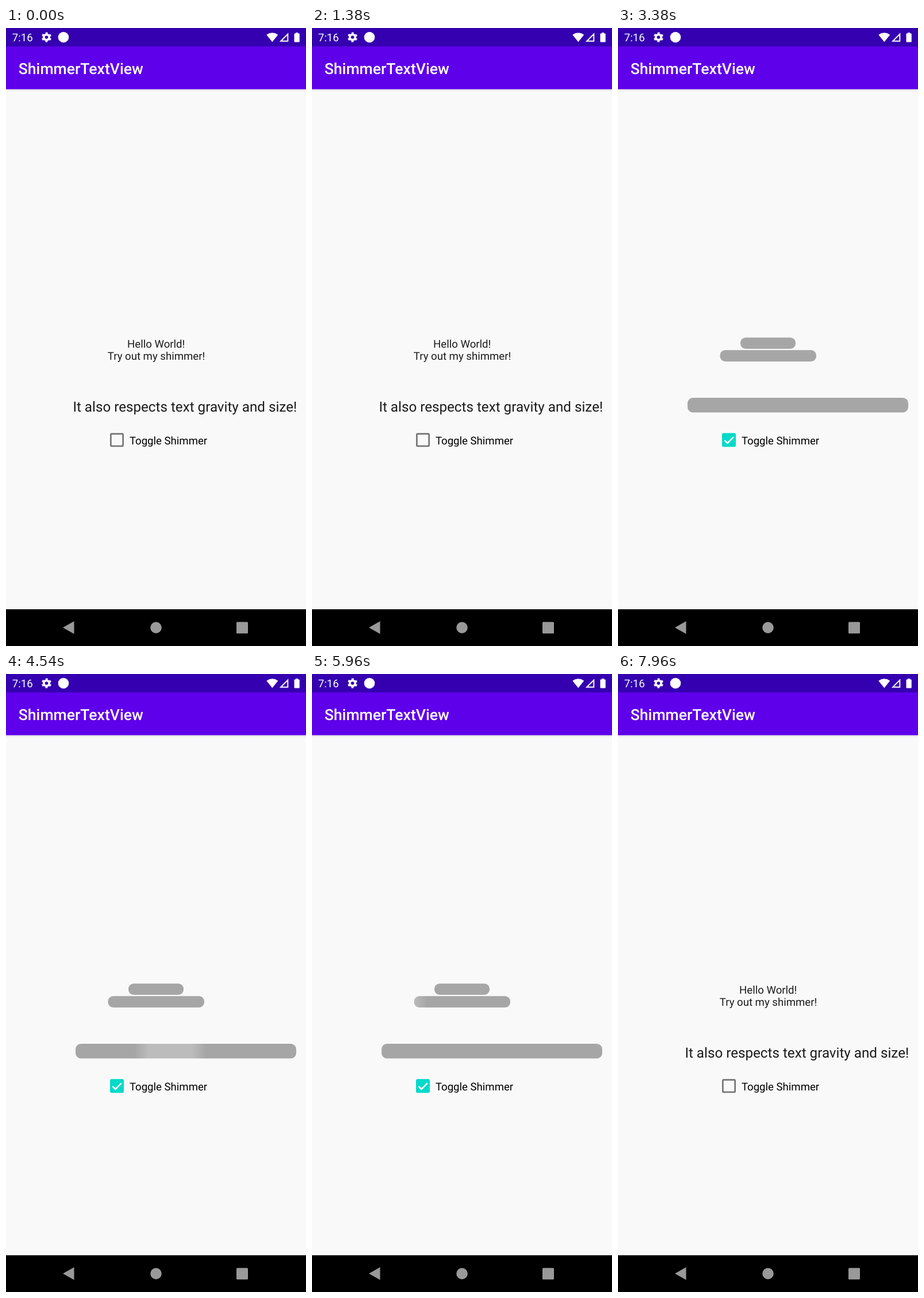
An HTML page for the animation above (8 s loop, 522 px wide and 1073 px high).

```html
<!DOCTYPE html>
<html lang="en">
<head>
<meta charset="utf-8">
<title>Shimmer text</title>
<style>
  html, body { margin: 0; height: 100%; overflow: hidden; background: #f9f9fa; }
  svg { display: block; width: 100vw; height: 100vh; }
  text {
    font: 18.6px Roboto, sans-serif; text-anchor: middle; fill: #1b1b1c;
    text-rendering: geometricPrecision;
  }
  .title { font-size: 26.58px; font-weight: 500; fill: #fff; }
  .large { font-size: 24.2px; }
  .nav { fill: #999; }
</style>
</head>
<body>
<svg viewBox="0 0 522 1073">
  <defs>
    <linearGradient id="shine" gradientUnits="userSpaceOnUse" x1="-62" x2="62">
      <stop offset="0" stop-color="#a6a6a6"/>
      <stop offset=".2" stop-color="#bcbcbc"/>
      <stop offset=".8" stop-color="#bcbcbc"/>
      <stop offset="1" stop-color="#a6a6a6"/>
    </linearGradient>
    <linearGradient id="smallShine" href="#shine"/>
    <linearGradient id="largeShine" href="#shine"/>
    <linearGradient id="shadow" x2="0" y2="1">
      <stop offset="0" stop-opacity=".1"/>
      <stop offset="1" stop-opacity="0"/>
    </linearGradient>
  </defs>

  <rect width="522" height="1073" fill="#f9f9fa"/>
  <rect y="106" width="522" height="5" fill="url(#shadow)"/>
  <rect width="522" height="106.3" fill="#5f00ea"/>
  <rect width="522" height="31.9" fill="#3400b0"/>
  <text class="title" x="130.3" y="79.7">ShimmerTextView</text>

  <!-- status bar -->
  <text x="28.8" y="23" style="fill:#fff">7:16</text>
  <g fill="#fff">
    <g fill="none" stroke="#fff" transform="translate(70.5 16)">
      <circle r="4.7" stroke-width="3.8"/>
      <circle r="7.4" stroke-width="2.4" stroke-dasharray="3.8 3.95" stroke-dashoffset="-1.98"/>
    </g>
    <circle cx="100" cy="16" r="9.3"/>
    <path d="M453.3 11.7Q463.3 4.9 473.3 11.7L463.3 24.2Z"/>
    <path fill-rule="evenodd" d="M491.3 8.3V23.8H475.8ZM489.3 13.100V21.8H480.6Z"/>
    <rect x="504" y="8" width="4.300" height="3"/>
    <rect x="501.500" y="9.600" width="9.300" height="14.800" rx="1"/>
  </g>

  <g id="words">
    <text x="261.2" y="554.5">Hello World!</text>
    <text x="261.5" y="576.4">Try out my shimmer!</text>
    <text class="large" x="311.3" y="666">It also respects text gravity and size!</text>
  </g>
  <g id="bars">
    <rect x="213" y="537.5" width="96" height="19.5" rx="9" fill="url(#smallShine)"/>
    <rect x="177.500" y="559.3" width="167.5" height="19.7" rx="9" fill="url(#smallShine)"/>
    <rect x="121" y="642" width="384" height="25.5" rx="9.5" fill="url(#largeShine)"/>
  </g>

  <g transform="translate(193 715.3)">
    <circle id="ripple"/>
    <rect id="box" x="-12" y="-12" width="24" height="24" rx="2.7"/>
    <rect id="hole" x="-9.3" y="-9.3" width="18.6" height="18.6" fill="#f9f9fa"/>
    <path id="tick" d="M-7.6 .6L-2.6 5.500L7.8-5" fill="none" stroke="#fff" stroke-width="2.6"/>
  </g>
  <text x="282.5" y="722.6" style="fill:#000">Toggle Shimmer</text>

  <rect y="1009.2" width="522" height="63.8"/>
  <path class="nav" d="M99 1041.1L118.500 1030.100V1052.100Z"/>
  <circle class="nav" cx="261" cy="1041.1" r="9.8"/>
  <rect class="nav" x="401" y="1031.2" width="20" height="20" rx="1.500"/>
</svg>

<script>
const LOOP = 8000, TURN_ON = 2543, TURN_OFF = 6650, SWEEP = 794;
const VIEW_WIDTH = 490, SMALL_LEFT = 176, LARGE_LEFT = 16;
const get = id => document.getElementById(id);
const clamp = v => Math.max(0, Math.min(1, v));
const set = (id, attrs) => {
  for (const name in attrs) get(id).setAttribute(name, attrs[name]);
};

function drawShimmer(t) {
  // The band eases from one view width left of the middle to one right of it.
  const phase = (t - TURN_ON) % SWEEP / SWEEP;
  const center = VIEW_WIDTH / 2 - VIEW_WIDTH * Math.cos(Math.PI * phase);
  set("smallShine", { gradientTransform: `translate(${SMALL_LEFT + center})` });
  set("largeShine", { gradientTransform: `translate(${LARGE_LEFT + center})` });
}

function drawCheckbox(t, checked) {
  const color = checked ? "#03dac9" : "#757575";
  const fill = clamp((t - TURN_ON) / 220) - clamp((t - TURN_OFF) / 220);
  set("box", { fill: color });
  set("hole", { transform: `scale(${clamp(1 - 2 * fill)})` });
  set("tick", { transform: `scale(${clamp(2 * fill - 1)})` });

  const press = (t < 4500 ? TURN_ON : TURN_OFF) - 45;
  const age = (t - press) / 485;
  const opacity = age < 0 ? 0 : 0.18 * clamp(1.6 * (1 - age));
  set("ripple", { r: 23 * clamp(age * 2.5), fill: color, opacity });
}

function draw(t) {
  const checked = t >= TURN_ON && t < TURN_OFF;
  get("words").style.display = checked ? "none" : "";
  get("bars").style.display = checked ? "" : "none";
  if (checked) drawShimmer(t);
  drawCheckbox(t, checked);
}

const start = performance.now();
function tick() {
  draw((performance.now() - start) % LOOP);
  requestAnimationFrame(tick);
}
tick();
</script>
</body>
</html>
```
